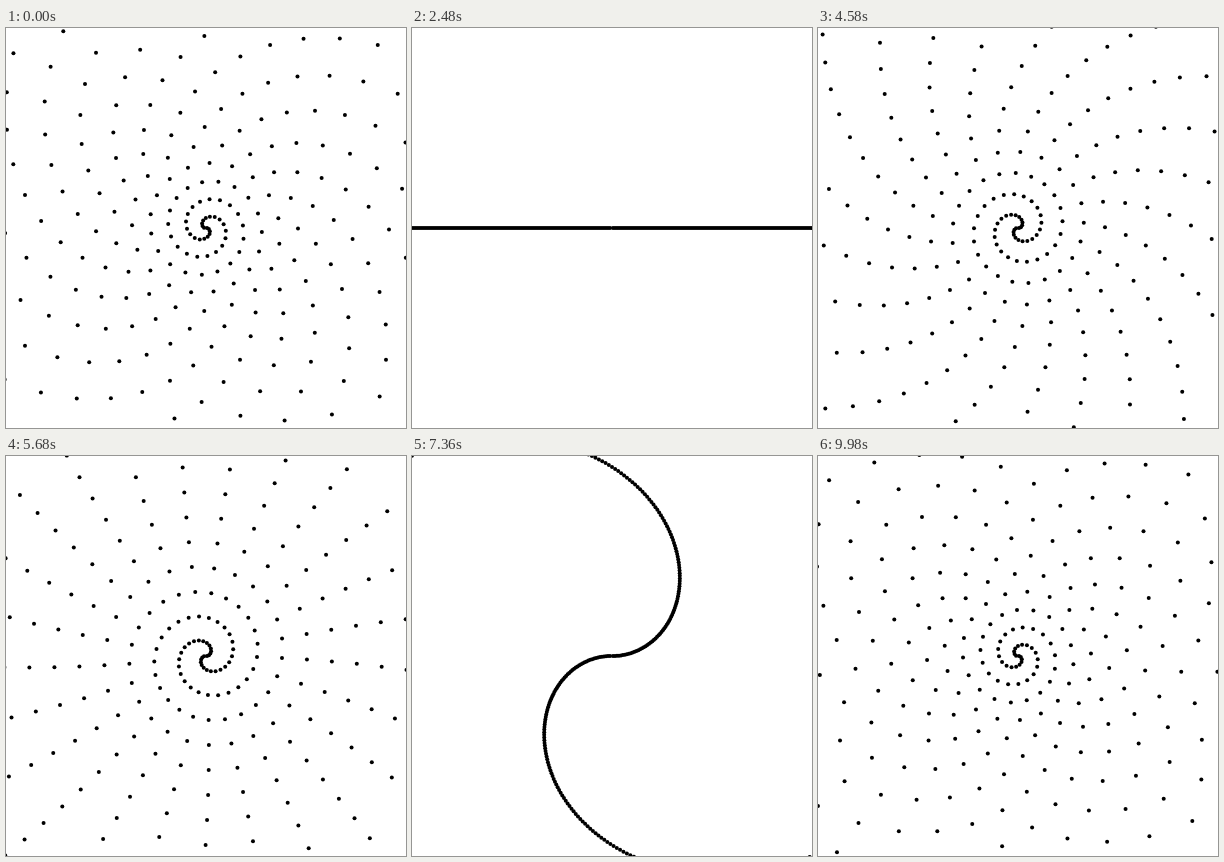
An HTML page with a canvas for the animation above (10 s loop, 400 by 400 pixels).

```html
<!DOCTYPE html>
<html lang="en">
<head>
<meta charset="utf-8">
<title>Spiral dots</title>
<style>
html, body { margin: 0; width: 100%; height: 100%; overflow: hidden; background: #fff; }
canvas { display: block; width: 400px; height: 400px; }
</style>
</head>
<body>
<canvas id="stage" width="400" height="400"></canvas>
<script>
const ctx = document.getElementById("stage").getContext("2d");
const SIZE = 400;
const CENTER = SIZE / 2;
const STEP_MS = 20;
const STEPS = 500;
const DOTS = 300;
const DOT_RADIUS = 2;
const TWIST_PER_STEP = 0.07978 * Math.PI / 180;

// Turn between neighbouring dots: half a turn plus a triangle wave.
function turnAt(step) {
  return Math.PI + TWIST_PER_STEP * (Math.abs(step - 249) - 125);
}

function draw(time) {
  const step = Math.floor(time / STEP_MS + 1e-6) % STEPS;
  const turn = turnAt(step);
  ctx.fillStyle = "#fff";
  ctx.fillRect(0, 0, SIZE, SIZE);
  ctx.fillStyle = "#000";
  for (let i = 0; i < DOTS; i++) {
    const distance = i + 1;
    const x = CENTER + distance * Math.cos(i * turn);
    const y = CENTER + distance * Math.sin(i * turn);
    ctx.beginPath();
    ctx.arc(x, y, DOT_RADIUS, 0, 2 * Math.PI);
    ctx.fill();
  }
}

function tick() {
  draw(performance.now());
  requestAnimationFrame(tick);
}
tick();
</script>
</body>
</html>
```
